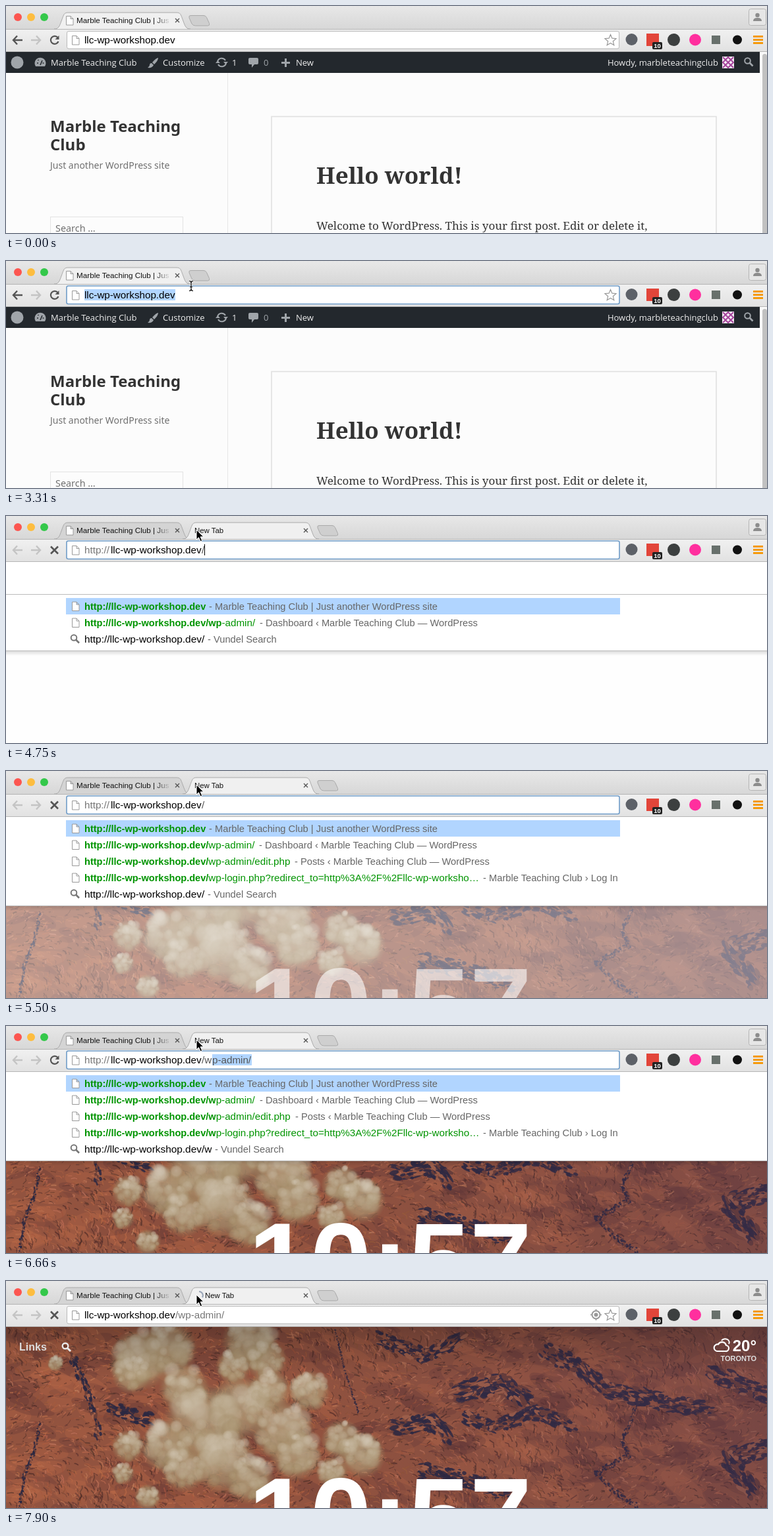
An HTML page with a canvas that plays this animation: 1155 px wide and 346 px high, repeating every 7990 ms.

```html
<!DOCTYPE html>
<html lang="en">
<head>
<meta charset="utf-8">
<title>Opening the dashboard</title>
<style>
html, body { margin: 0; width: 100%; height: 100%; overflow: hidden; background: #fefefe; }
canvas, svg { position: absolute; left: 0; top: 0; }
text { white-space: pre; font-family: "Liberation Sans", Arial, sans-serif; }
.bar text { font: 13px "Open Sans", sans-serif; fill: #eee; }
.sans { font-family: "Noto Sans", sans-serif; }
.serif { font-family: "Noto Serif", serif; }
</style>
</head>
<body>
<canvas id="photo" width="1155" height="346"></canvas>
<svg id="stage" width="1155" height="346"></svg>
<script>
const LOOP = 7990, SITE = 'Marble Teaching Club', HOST = 'llc-wp-workshop.dev', BLUE = '#b1d5ff';
const stage = document.getElementById('stage'), photo = document.getElementById('photo');

// ---- SVG helpers ----
const rect = (x, y, w, h, fill, more = '') =>
  `<rect x="${x}" y="${y}" width="${w}" height="${h}" fill="${fill}" ${more}/>`;
const disc = (x, y, r, fill, more = '') => `<circle cx="${x}" cy="${y}" r="${r}" fill="${fill}" ${more}/>`;
const line = (d, color, w = 1, more = '') =>
  `<path d="${d}" fill="none" stroke="${color}" stroke-width="${w}" ${more}/>`;
const text = (x, y, size, fill, s, more = '') =>
  `<text x="${x}" y="${y}" font-size="${size}" fill="${fill}" ${more}>${s}</text>`;
const sheet = (x, y) =>
  `<path d="M${x + .5} ${y - 6.5}h6.500l4 4v9.500h-10.500zM${x + 7} ${y - 6.5}v4h4" fill="#fff" stroke="#999"/>`;
const lens = (x, y, color, w = 2) =>
  disc(x - 1.5, y - 1.5, 4.3, 'none', `stroke="${color}" stroke-width="${w}"`) +
  line(`M${x + 1.5} ${y + 1.5}l5 5`, color, w + .6);
const cross = (x, y, r, color, w) =>
  line(`M${x - r} ${y - r}l${2 * r} ${2 * r}m0 ${-2 * r}l${-2 * r} ${2 * r}`, color, w);

const DEFS = `<defs>
  <linearGradient id="top" x2="0" y2="1"><stop stop-color="#e8e8e8"/><stop offset="1" stop-color="#d7d7d7"/></linearGradient>
  <linearGradient id="tool" x2="0" y2="1"><stop stop-color="#f0f0f0"/><stop offset="1" stop-color="#e2e2e2"/></linearGradient>
  <linearGradient id="shade" x2="0" y2="1"><stop stop-opacity=".22"/><stop offset="1" stop-opacity="0"/></linearGradient>
  <linearGradient id="fade" gradientUnits="userSpaceOnUse" x1="226" x2="250"><stop stop-color="#111"/><stop offset="1" stop-color="#111" stop-opacity="0"/></linearGradient>
</defs>`;

// ---- Blog page ----
function blog() {
  const ink = '#333';
  return rect(0, 69, 1155, 277, '#fcfcfc') + rect(336, 102, 1, 244, '#e6e6e6') +
    rect(403, 168.5, 675, 200, '#fcfcfc', 'stroke="#e0e0e0" stroke-width="1.6"') +
    text(67, 192, 24, ink, 'Marble Teaching', 'class="sans" font-weight="700"') +
    text(67, 220, 24, ink, 'Club', 'class="sans" font-weight="700"') +
    text(67, 248, 14, '#707070', 'Just another WordPress site', 'class="sans"') +
    rect(67.5, 321.5, 201, 40, '#fcfcfc', 'stroke="#e3e3e3"') +
    text(75, 344, 14.4, '#707070', 'Search …', 'class="sans"') +
    text(471, 271, 35, ink, 'Hello world!', 'class="serif" font-weight="700"') +
    text(471, 341, 17, ink, 'Welcome to WordPress. This is your first post. Edit or delete it,', 'class="serif"') +
    adminBar() + rect(1144, 70, 11, 276, '#fafafa') + rect(1148, 73, 7, 290, '#c1c1c1', 'rx="3.5"');
}

function adminBar() {
  const grey = '#a0a5aa';
  let s = rect(0, 70, 1144, 32, '#23282d') + disc(17, 86, 9.5, grey) +
    `<path d="M45 92a8.500 8.500 0 1 1 14 0z" fill="${grey}"/>` + line('M52 90l3-7M47 87h2M55.500 87h2M48.500 82l1 1', '#23282d', 1.5) +
    `<path d="M231 79q-3 0-9 7l3 3q6-6 6-10zM221 87l3 3q-2 5-9 4q3-2 3-4q0-3 3-3z" fill="${grey}"/>` +
    line('M321 85a6.500 6.500 0 0 1 12-2M334 87a6.500 6.500 0 0 1-12 2', grey, 2) +
    `<path d="M330 85h7l-3.500 4zM318 87h7l-3.500-4z" fill="${grey}"/>` +
    `<path d="M370 79h11q2 0 2 2v6q0 2-2 2h-4l-4 5v-5h-3q-2 0-2-2v-6q0-2 2-2z" fill="${grey}"/>` +
    line('M424.500 80v13M418 86.500h13', grey, 3);
  const labels = [[68, SITE], [238, 'Customize'], [343, '1'], [440, 'New']];
  s += labels.map(([x, l]) => text(x, 91, 13, '#eee', l)).join('') +
    text(391, 91, 13, '', '0', 'style="fill:#a0a5aa"') +
    text(1081, 91, 13, '#eee', 'Howdy, marbleteachingclub', 'text-anchor="end"');
  s += rect(1087, 77, 18, 18, '#f6eaf5') +
    line('M1088 78l16 16m0-16l-16 16M1096 78l8 8l-8 8l-8-8z', '#a4449b', 2) + lens(1127, 85, grey);
  return `<g class="bar">${s}</g>`;
}

// ---- Start page text over the photo ----
const startPage = opacity => `<g opacity="${opacity}">` + rect(0, 69, 1155, 75, 'url(#shade)') +
  text(20, 106, 16, '#ddd', 'Links', 'font-weight="700"') + lens(91.5, 100.5, '#e8e8e8', 2.4) +
  line('M1079 107h13a4.500 4.500 0 0 0 1-9a6.500 6.500 0 0 0-12-1.500a5 5 0 0 0-2 10.500z', '#fff', 2.2) +
  line('M1086 91a6 5 0 0 1 11 5', '#fff', 2) +
  text(1139, 107, 24, '#fff', '20°', 'text-anchor="end" font-weight="700"') +
  text(1139, 122, 11, '#ddd', 'TORONTO', 'text-anchor="end" font-weight="700"') +
  text(368, 418, 168, '#fff', '10:57', 'font-weight="700"') + '</g>';

// ---- Suggestion list ----
// Each row: bold part, plain part, x of the description, description
function rowsFor(typed, withHome) {
  const base = `http://${HOST}`, bold = `${base}/${typed}`, d = typed ? 1 : 0, rest = s => s.slice(typed.length);
  const wp = `${SITE} — WordPress`;
  const rows = [
    [bold, rest('wp-admin/'), 384 + d, `- Dashboard ‹ ${wp}`],
    [bold, rest('wp-admin/edit.php'), 438 + d, `- Posts ‹ ${wp}`],
    [bold, rest('wp-login.php?redirect_to=http%3A%2F%2Fllc-wp-worksho…'), 724, `- ${SITE} › Log In`],
    ['', bold, [306, 317, 326][typed.length], '- Vundel Search']
  ];
  if (withHome) rows.unshift([base, '', 308, `- ${SITE} | Just another WordPress site`]);
  return rows;
}

function popup(rows, top, bottom) {
  let s = rect(0, 69, 1155, bottom - 69, '#fff') + rect(91, top, 841, 25, BLUE);
  rows.forEach(([bold, plain, x, note], i) => {
    const y = top + 12.5 + 25 * i;
    s += bold ? sheet(100, y) : lens(104.5, y - .5, '#777');
    s += `<text x="119" y="${y + 5.5}" font-size="${bold ? 15.2 : 15.4}" fill="${bold ? '#009400' : '#000'}">` +
      `<tspan font-weight="700" font-size="14.56">${bold}</tspan>${plain}</text>` +
      text(x, y + 5.5, 14.7, '#666', note);
  });
  return s + rect(0, bottom, 1155, 1, '#bbb') + rect(0, bottom + 1, 1155, 7, 'url(#shade)', 'opacity=".6"');
}

function suggestions(t) {
  if (t < 4750 || t >= 7820) return '';
  if (t < 4840) {
    const rows = rowsFor('', true);
    const list = [rows[0], rowsFor('wp', false)[0], rows[4]];
    return popup(list, 125, 205) + rect(0, 119, 1155, 1, '#bbb');
  }
  if (t < 7190) return popup(rowsFor(t < 6660 ? '' : t < 6830 ? 'w' : 'wp', true), 75, 205);
  return t < 7280 ? popup(rowsFor('wp', false), 67, 172) : popup(rowsFor('wp', false), 75, 180);
}

// ---- Browser frame ----
const tab = (x, w, fill) =>
  `<path d="M${x} 35c7 0 8-4 11-12c4-11 4-13 11-13H${x + w - 22}c7 0 7 2 11 13c3 8 4 12 11 12" fill="${fill}" stroke="#aaa"/>`;

function tabs(t) {
  const open = t >= 4190, w = t < 4280 ? 95 : 207, plusX = open ? 268 + w - 3 : 277;
  const hover = t >= 3930 && t < 4190;
  let s = rect(0, 0, 1155, 35, 'url(#top)');
  [['#fc5650', 18], ['#fdbd3f', 38], ['#34c84a', 58]].forEach(([c, x]) => s += disc(x, 17, 6, c));
  s += `<path d="M${plusX + 3} 14.500h20q3 0 4.500 3l4 9q1 3.500-2 3.500h-19q-4 0-5.500-3l-4-9q-1-3.500 2-3.500z" fill="${hover ? '#e8e8e8' : '#cfcfcf'}" stroke="#aaa"/>`;
  const first = fill => tab(73, 207, fill) + sheet(91, 22) +
    text(107, 26, 11.7, 'url(#fade)', `${SITE} | Jus`) + cross(260, 22, 3, '#555', 1.4);
  const base = line('M0 35.500H1155', '#b4b4b4');
  if (!open) return s + base + first('#f0f0f0');
  s += first('#d4d4d4') + base + tab(268, w, '#f0f0f0') + cross(268 + w - 20, 22, 3, '#555', 1.4);
  if (t >= 7900) s += line('M293 16a6 6 0 0 1 5 9', '#9aa5b8', 2) + text(302, 26, 11.4, '#111', 'New Tab');
  else if (t >= 4580) s += text(286, 26, 11.4, '#111', 'New Tab');
  return s;
}

function address(t) {
  const size = 15.2, y = 57, put = (x, c, s) => text(x, y, size, c, s);
  const selection = (x, w) => rect(x, 43, w, 17, BLUE);
  if (t < 4190) return (t >= 2230 ? selection(119, 138) : '') + put(119, '#000', HOST);
  if (t < 4750) return '';
  if (t >= 7820) return put(119, '#000', HOST) + put(257, '#777', '/wp-admin/');
  const typed = t < 6570 ? '' : t < 6830 ? 'w' : 'wp';
  const from = typed === 'w' ? 313 : 321;
  return (typed ? selection(from, 373 - from) : '') +
    put(119, '#777', 'http://') + put(159, '#000', HOST) + put(297, '#555', '/' + typed) +
    (typed ? put(from, '#555', 'wp-admin/'.slice(typed.length)) : '');
}

function toolbar(t) {
  const open = t >= 4190, focus = t >= 2140 && t < 7820, editing = open && t < 7820;
  const loading = open && (t < 6010 || t >= 7820), dark = '#555', pale = '#c4c4c4';
  const arrow = (x, dir, c) => line(`M${x} 52h${14 * dir}M${x + 6 * dir} 45.500l${-6 * dir} 6.500l${6 * dir} 6.500`, c, 2.4);
  let s = rect(0, 36, 1155, 33, 'url(#tool)') + rect(0, 69, 1155, 1, '#b5b5b5') +
    arrow(11, 1, open ? pale : dark) + arrow(52, -1, pale);
  s += loading ? cross(73.5, 52, 5.5, dark, 2.6)
    : line('M78.500 48a6 6 0 1 0 1 6', dark, 2.2) + `<path d="M80.500 45v6h-6z" fill="${dark}"/>`;
  s += focus ? rect(92, 38, 839, 27.5, '#fff', 'rx="2.5" stroke="#6f9cc8" stroke-width="1.6"')
    : rect(92.5, 38.5, 838, 26.5, '#fff', 'rx="2.5" stroke="#b9b9b9"');
  s += open && t < 4750 ? lens(105, 52, '#888') : sheet(100, 52);
  s += address(t);
  if (t >= 4280 && t < 4750) s += rect(119, 43, 1, 17, '#000');
  if (t >= 4750 && t < 5380 || t >= 5920 && t < 6390) s += rect(301, 43, 1, 17, '#000');
  if (!editing) s += line('M917.500 43.500l2.400 5.700l6.100.5l-4.700 4l1.500 6l-5.300-3.300l-5.300 3.300l1.500-6l-4.700-4l6.100-.5z', '#999', 1.2);
  if (t >= 7820) s += disc(895.5, 51.5, 6, 'none', 'stroke="#999" stroke-width="2"') + disc(895.5, 51.5, 3, '#999') +
    line('M895.500 43v3m0 11v3M887 51.500h3m11 0h3', '#999', 1.6);
  s += disc(949.5, 51, 9, '#5d6168') + rect(972, 42, 19, 19, '#e2453a') +
    rect(981, 55, 15, 11, '#222', 'rx="2"') + text(988.5, 64, 9.5, '#fff', '10', 'text-anchor="middle" font-weight="700"') +
    disc(1013.5, 51.5, 9.5, '#3c3f3f') + disc(1046, 51.5, 9, '#ff2f9e') +
    rect(1071, 45, 13, 13, '#68706c') + disc(1110, 51.5, 7, '#111');
  [46, 51, 56].forEach(y => s += rect(1134, y - 1, 15, 3, '#f59a0c'));
  return s + rect(1127.5, 4.5, 26, 25, '#e6e6e6', 'rx="3" stroke="#b5b5b5"') + disc(1140.5, 14, 3.2, '#8c8c8c') +
    '<path d="M1134 23q0-5 6.500-5t6.500 5z" fill="#8c8c8c"/>';
}

// ---- Pointer: time, x, y ----
const TRACK = [[1340, 298, 246], [1640, 284, 165], [1800, 264, 118], [1920, 270, 85], [2050, 297, 58],
  [3309, 297, 58], [3310, 281, 38], [3400, 281, 37], [3570, 289, 21], [LOOP, 289, 21]];

function pointer(t) {
  const i = TRACK.findIndex(k => k[0] > t);
  if (i < 1) return '';
  const [a, b] = [TRACK[i - 1], TRACK[i]], p = (t - a[0]) / (b[0] - a[0]);
  const [x, y] = [1, 2].map(n => +(a[n] + (b[n] - a[n]) * p).toFixed(1));
  if (y > 36 && y < 66) {
    const d = `M${x - 3} ${y - 7.5}q3 0 3 2.500v10q0 2.500-3 2.500m6-15q-3 0-3 2.500m0 10q0 2.500 3 2.500m-5-6h4`;
    return line(d, '#fff', 2.6, 'opacity=".7"') + line(d, '#000', 1.2);
  }
  return `<path d="M${x} ${y}v15l3.500-3.300l2.600 6l2.600-1.100l-2.600-5.800h4.900z" fill="#000" stroke="#fff"/>`;
}

// ---- Aerial picture: ground, ridges, clouds ----
function paintPhoto() {
  const g = photo.getContext('2d');
  let seed = 7;
  const rnd = () => (seed = seed * 16807 % 2147483647) / 2147483647;
  const blob = (x, y, rx, ry, turn) => { g.beginPath(); g.ellipse(x, y, rx, ry, turn, 0, 7); g.fill(); };
  const puff = (x, y, r, light, alpha) => {
    const fill = g.createRadialGradient(x, y - r * .15, 0, x, y, r);
    [[0, 0, 1], [.65, 5, .8], [1, 14, 0]].forEach(([at, dim, a]) =>
      fill.addColorStop(at, `hsla(37,25%,${light - dim}%,${alpha * a})`));
    g.fillStyle = fill;
    blob(x, y, r, r, 0);
  };

  g.fillStyle = '#92533f';
  g.fillRect(0, 70, 1155, 276);
  // Broad dark and bright patches, then fine cracks
  for (let i = 0; i < 420; i++) {
    const r = 5 + rnd() * 22;
    g.fillStyle = rnd() < .55 ? 'rgba(92,50,50,.28)' : 'rgba(190,108,72,.25)';
    blob(rnd() * 1155, 70 + rnd() * 276, r * 1.6, r * .6, rnd() - .3);
  }
  for (let i = 0; i < 6500; i++) {
    const x = rnd() * 1155, y = 70 + rnd() * 276, a = Math.sin(x / 90 + y / 50) + rnd() * 1.6 - .5, n = 2 + rnd() * 10;
    const dark = rnd() < .42;
    g.strokeStyle = dark ? `hsla(${rnd() * 16},32%,${18 + rnd() * 12}%,.6)` : `hsla(${13 + rnd() * 8},46%,${38 + rnd() * 20}%,.65)`;
    g.lineWidth = .6 + rnd() * 1.5;
    g.beginPath();
    g.moveTo(x, y);
    g.lineTo(x + n * .5 * Math.cos(a) + rnd() * 3, y + n * .5 * Math.sin(a));
    g.lineTo(x + n * Math.cos(a), y + n * Math.sin(a) + rnd() * 3);
    g.stroke();
  }
  // width, then points
  const ridges = [
    [15, 815, 105, 875, 135, 910, 165, 985, 182, 1070, 198], [17, 680, 172, 755, 155, 795, 185],
    [16, 590, 222, 650, 215, 670, 235], [13, 695, 205, 740, 222, 810, 200, 860, 222],
    [5, 955, 195, 935, 245, 945, 268, 895, 292, 930, 325, 960, 346], [4, 52, 215, 42, 262, 28, 295, 20, 346],
    [9, 100, 115, 130, 185, 140, 235], [13, 158, 195, 220, 212], [13, 570, 88, 640, 115, 690, 88],
    [15, 1070, 140, 1150, 172], [17, 1155, 255, 1095, 270, 1140, 325], [15, 630, 290, 700, 303, 765, 325],
    [2, 500, 75, 515, 140, 535, 200]
  ];
  for (const [w, ...p] of ridges)
    for (let i = 0; i + 3 < p.length; i += 2) {
      const dx = p[i + 2] - p[i], dy = p[i + 3] - p[i + 1], n = Math.hypot(dx, dy) * 1.3;
      for (let k = 0; k < n; k++) {
        const x = p[i] + dx * k / n + (rnd() - .5) * w, y = p[i + 1] + dy * k / n + (rnd() - .5) * w * 1.7;
        g.fillStyle = rnd() < .62 ? 'rgba(42,40,66,.85)' : rnd() < .6 ? '#6b3f38' : '#a3624a';
        blob(x, y, w * (.15 + rnd() * .4), 1 + w * rnd() * .16, Math.atan2(dy, dx) + rnd() * .8 - .4);
      }
    }
  const haze = g.createLinearGradient(500, 346, 1155, 70);
  haze.addColorStop(0, 'rgba(75,50,75,0)');
  haze.addColorStop(1, 'rgba(75,50,75,.4)');
  g.fillStyle = haze;
  g.fillRect(0, 70, 1155, 276);

  const puffs = [205, 115, 42, 245, 100, 40, 190, 140, 26, 270, 160, 34, 370, 90, 38, 395, 118, 28, 345, 128, 24,
    300, 215, 56, 245, 250, 36, 355, 190, 45, 420, 225, 42, 460, 165, 28, 400, 165, 30, 440, 262, 35, 510, 240, 28,
    540, 262, 32, 330, 270, 45, 270, 285, 30, 185, 250, 22, 178, 292, 15, 215, 328, 18, 370, 300, 33, 495, 290, 22, 75, 125, 11];
  const each = paint => { for (let i = 0; i < puffs.length; i += 3) paint(puffs[i], puffs[i + 1], puffs[i + 2]); };
  each((x, y, r) => puff(x, y + r * .1, r * 1.15, 60, .85));
  each((cx, cy, r) => {
    for (let k = 0; k < 26; k++) {
      const a = rnd() * 6.3, d = r * .9 * Math.sqrt(rnd()), up = Math.sin(a) * d / r;
      puff(cx + d * Math.cos(a), cy + d * Math.sin(a), r * (.14 + rnd() * .28), 66 - 13 * up + rnd() * 6, .5);
    }
  });
}

// ---- Playback ----
let shown = '';
function draw(now) {
  const t = Math.max(0, now - start) % LOOP;
  const opacity = t < 5380 ? 0 : Math.min(1, (t - 5220) / 470).toFixed(2);
  const scene = DEFS + (t < 4190 ? blog() : startPage(opacity)) + suggestions(t) + tabs(t) + toolbar(t) + pointer(t);
  photo.style.opacity = opacity;
  if (scene !== shown) stage.innerHTML = shown = scene;
  requestAnimationFrame(draw);
}
paintPhoto();
const start = performance.now();
draw(start);
</script>
</body>
</html>
```
